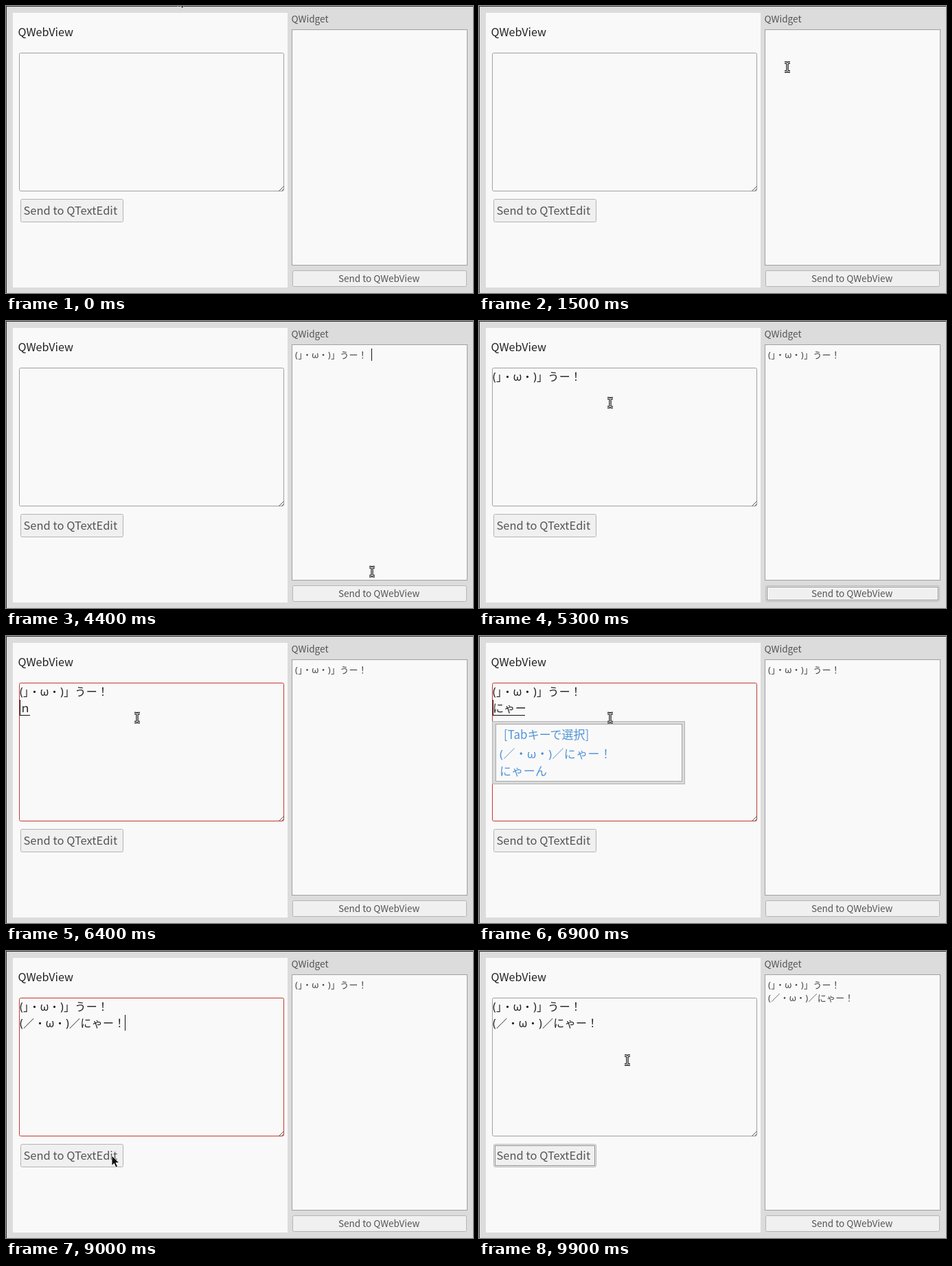
Write an HTML page that moves like this. It is 680x418 px and loops after 10 s.

```html
<!DOCTYPE html>
<html lang="ja">
<head>
<meta charset="utf-8">
<style>
html, body { margin: 0; width: 100%; height: 100%; overflow: hidden; background: #dcdcdc; }
svg { display: block; width: 680px; height: 418px; }
text { font-family: 'Noto Sans CJK JP', 'Noto Sans CJK', 'Noto Sans', sans-serif; font-weight: 300; fill: #555; }
.jp { font-family: 'Noto Sans', 'Noto Sans CJK JP', 'Noto Sans CJK', sans-serif; letter-spacing: .02em; }
.big { font-size: 16px; fill: #222; }
.small { font-size: 13px; fill: #444; }
.cand { font-size: 17px; fill: #5294d6; }
.hot { fill: #ee3311; }
.field { fill: #f9f9f9; stroke: #a0a0a0; }
.button { fill: #f0f0f0; stroke: #b4b4b4; }
.ring { fill: none; stroke: #333; stroke-dasharray: 1 1; }
.caret { stroke: #111; }
.frame { fill: #dadada; stroke: #b4b4b4; }
.paper { fill: #f9f9f9; stroke: #a8a8a8; }
</style>
</head>
<body>
<svg viewBox="0 0 680 418">
  <rect width="680" height="418" fill="#dcdcdc"/>
  <path d="M0 .5H680M.5 0V418" stroke="#333"/>
  <rect x="10" y="10" width="400" height="400" fill="#f9f9f9"/>

  <text x="17.5" y="44" font-size="16.2" style="fill:#222">QWebView</text>
  <rect id="area" class="field" x="19.5" y="68.5" width="385" height="201" rx="2"/>
  <path d="M397.5 269.5l7-7M401.5 269.5l3-3" stroke="#555"/>
  <text id="area1" class="jp big" x="20" y="87"></text>
  <text id="area2" class="jp big" x="20" y="111"></text>
  <path id="under" stroke="#111"/>
  <path id="areaCaret" class="caret"/>
  <rect id="leftBtn" class="button" x="21.5" y="281.5" width="149" height="33" rx="2"/>
  <rect id="leftRing" class="ring" x="23.5" y="283.5" width="145" height="29"/>
  <text x="25.5" y="304" font-size="16.5">Send to QTextEdit</text>

  <text x="415.5" y="24" font-size="13.6">QWidget</text>
  <rect class="field" x="416.5" y="34.5" width="255" height="343"/>
  <rect id="mark" x="421" y="39" width="111" height="19" fill="#d84a38"/>
  <text id="edit1" class="jp small" x="421" y="54"></text>
  <text id="edit2" class="jp small" x="421" y="73"></text>
  <path id="editUnder" stroke="#111"/>
  <path id="editCaret" class="caret"/>
  <rect id="rightBtn" class="button" x="417.5" y="385.5" width="253" height="23" rx="2"/>
  <rect id="rightRing" class="ring" x="419.5" y="387.5" width="249" height="19"/>
  <text x="484" y="402" font-size="13.5">Send to QWebView</text>

  <g id="convert">
    <rect class="frame" x="420.5" y="65.5" width="270" height="66"/>
    <rect class="paper" x="424.5" y="69.5" width="262" height="58"/>
    <text class="cand" x="433" y="91" letter-spacing="2">[1/1]</text>
    <text class="cand" x="430" y="119">1.</text>
    <text class="jp cand hot" x="446" y="119">(」・ω・)」うー！</text>
    <text class="cand hot" x="598" y="119">[ひらがな]</text>
  </g>
  <g id="suggest">
    <rect class="frame" x="19.5" y="124.5" width="280" height="91"/>
    <rect class="paper" x="24.5" y="128.5" width="271" height="83"/>
    <text class="cand" x="36" y="150">[Tabキーで選択]</text>
    <text id="pick" class="jp cand" x="30" y="178">(／・ω・)／にゃー！</text>
    <text class="jp cand" x="30" y="203">にゃーん</text>
  </g>

  <path id="arrow" d="M0 0V14.5L3.4 11.4L6 17.2L8.6 16L6 10.4H10.8Z" fill="#111" stroke="#fff" stroke-width=".8"/>
  <g id="beam" fill="none">
    <path d="M-4-6.5H-1.5L0-5.5L1.5-6.5H4M-4 6.5H-1.5L0 5.5L1.5 6.5H4M0-5.5V5.5" stroke="#111" stroke-width="3.4"/>
    <path d="M-4-6.5H-1.5L0-5.5L1.5-6.5H4M-4 6.5H-1.5L0 5.5L1.5 6.5H4M0-5.5V5.5" stroke="#fff" stroke-width="1.1"/>
  </g>
</svg>
<script>
const $ = id => document.getElementById(id);
const show = (id, on) => $(id).style.display = on ? '' : 'none';
const within = (t, a, b) => t >= a && t < b;
const U = '(」・ω・)」うー！', NYA = '(／・ω・)／にゃー！';

// pointer stops: time, x, y
const stops = [[0, 250, -14], [700, 250, -14], [1500, 449, 89], [3700, 449, 89], [4400, 533, 365],
  [4700, 540, 396], [4800, 540, 396], [5300, 191, 119], [8600, 191, 119], [9000, 154, 298],
  [9700, 154, 298], [9900, 216, 159]];
// texts: start time, content
const areaLine1 = [[4800, U]];
const areaLine2 = [[6400, 'ｎ'], [6600, 'ｎｙ'], [6700, 'にゃ'], [6900, 'にゃー'], [7100, NYA]];
const editLine1 = [[2300, 'う'], [2400, 'うー'], [2500, U]];
const editLine2 = [[9200, NYA]];

function pointer(t) {
  const i = stops.findIndex(s => s[0] > t);
  if (i < 0) return stops.at(-1).slice(1);
  const [a, b] = [stops[i - 1], stops[i]];
  const p = (t - a[0]) / (b[0] - a[0]), k = p * p * (3 - 2 * p);
  return [a[1] + (b[1] - a[1]) * k, a[2] + (b[2] - a[2]) * k];
}

function setText(id, steps, t) {
  const text = steps.filter(s => s[0] <= t).at(-1)?.[1] ?? '';
  if ($(id).textContent !== text) $(id).textContent = text;
  return text;
}

function setCaret(id, on, x, y, h) {
  show(id, on);
  $(id).setAttribute('d', `M${x} ${y}v${h}`);
}

function setUnder(id, on, x, y, w) {
  show(id, on);
  $(id).setAttribute('d', `M${x} ${y}h${w}`);
}

function draw(t) {
  setText('area1', areaLine1, t);
  const typed = setText('area2', areaLine2, t);
  const entry = setText('edit1', editLine1, t);
  setText('edit2', editLine2, t);

  const converting = within(t, 2500, 2800), suggesting = within(t, 6700, 8000);
  show('mark', converting);
  show('convert', converting);
  show('suggest', suggesting);
  $('edit1').style.fill = converting ? '#fff' : '';
  $('pick').style.fill = within(t, 7100, 8000) ? '#ee3311' : '';
  setUnder('editUnder', within(t, 2300, 2500), 421, 57.5, 13 * entry.length);
  setUnder('under', within(t, 6400, 8000), 20, 115.5, typed === NYA ? 152 : 16 * typed.length - 1);

  const editOn = within(t, 2000, 4700) && Math.floor(t / 500) % 2 === 0;
  setCaret('editCaret', editOn, t < 2300 ? 421.5 : t < 2500 ? 421.5 + 13 * entry.length : 532.5, 40, 18);
  const areaOn = within(t, 5500, 6000) || within(t, 6100, 7600) || within(t, 8000, 8500) || within(t, 9000, 9100);
  setCaret('areaCaret', areaOn, t < 6000 ? 157.5 : t < 8000 ? 20.5 : 173.5, t < 6000 ? 69 : 93, 23);

  $('area').style.stroke = within(t, 5500, 9100) ? '#c43a30' : '';
  show('rightRing', within(t, 4700, 5500));
  show('leftRing', t >= 9100);
  $('rightBtn').style.fill = within(t, 4700, 4800) ? '#d4d4d4' : '';
  $('leftBtn').style.fill = within(t, 9100, 9200) ? '#d4d4d4' : '';

  const [x, y] = pointer(t);
  const overText = within(x, 19, 405) && within(y, 68, 270) || within(x, 416, 672) && within(y, 34, 378);
  const beam = overText && !converting;
  show('beam', beam);
  show('arrow', !beam);
  $(beam ? 'beam' : 'arrow').setAttribute('transform', `translate(${Math.round(x)} ${Math.round(y)})`);
}

const start = performance.now();
function tick() {
  const t = (performance.now() - start) % 10000;
  draw(Math.floor(t / 100) * 100);
  requestAnimationFrame(tick);
}
tick();
</script>
</body>
</html>
```
